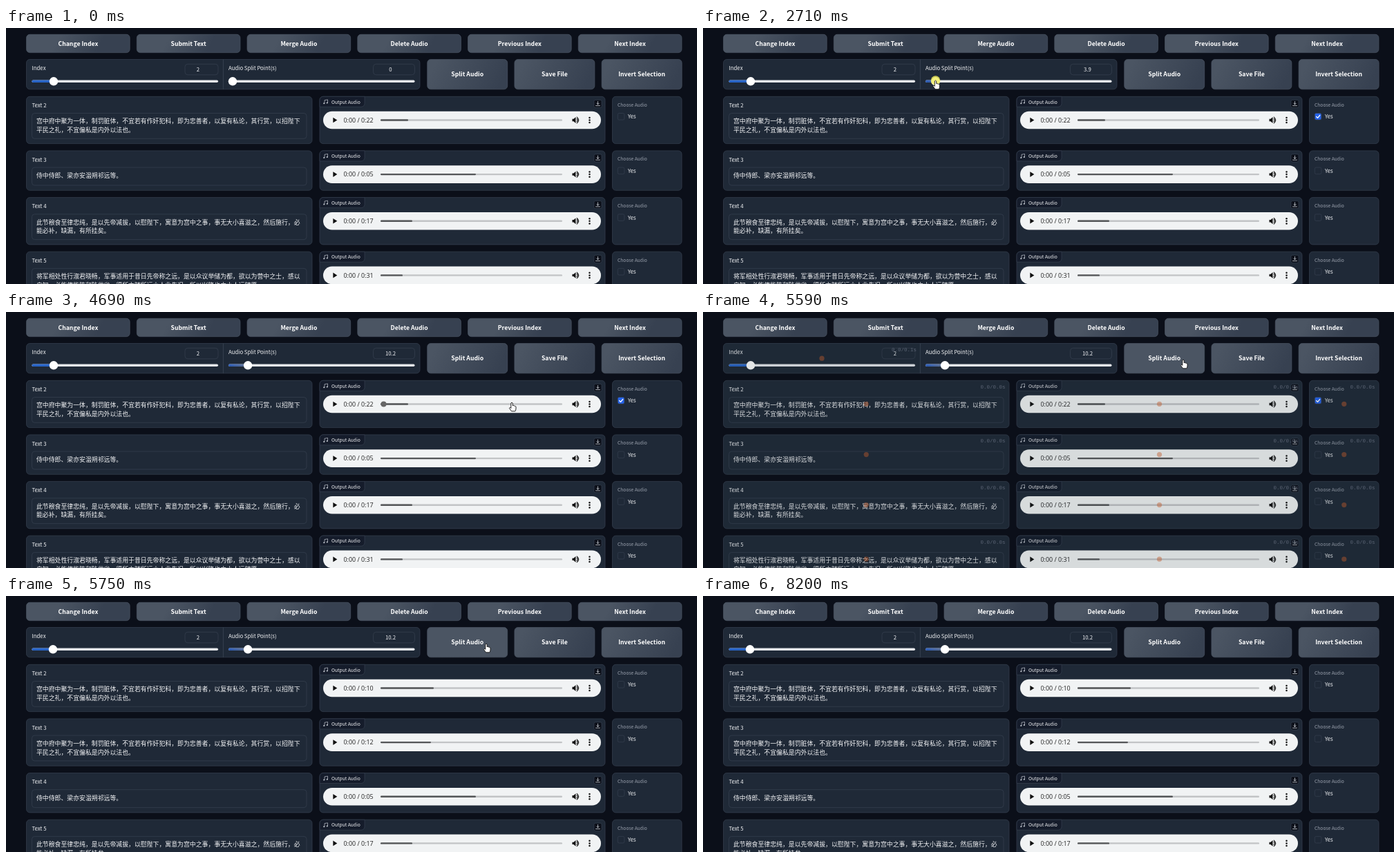
Write an HTML page with a canvas that moves like this. It is 1000x371 px and loops after 9610 ms.

```html
<!DOCTYPE html>
<html lang="zh-Hans">
<head>
<meta charset="utf-8">
<style>
html, body { margin: 0; width: 100%; height: 100%; overflow: hidden; background: #0b0f19; }
canvas { display: block; }
</style>
</head>
<body>
<canvas id="stage" width="1000" height="371"></canvas>
<script>
const ctx = document.getElementById('stage').getContext('2d');
const LOOP = 9610, STEP = 80;
const UI = '"Noto Sans CJK SC", "Noto Sans CJK", sans-serif';
const CLOCK = '"Open Sans", "Noto Sans", sans-serif';
const MONO = '"Liberation Mono", monospace';
const PANEL = '#1f2937', BORDER = '#374151', WHITE = '#f3f4f6';

// Text lines, clip length, end of the buffered part
const palace = [['宫中府中聚为一体，制罚脏体，不宜若有作奸犯科，即为忠善者，以复有私论，其行赏，以招陛下', '平民之礼，不宜偏私是内外以法也。'], '0:22', 582];
const aides = [['侍中侍郎、梁亦安温朔祁远等。'], '0:05', 680];
const advice = [['此节稂食至律忠纯，是以先帝减拔，以慰陛下，寓意为宫中之事，事无大小喜滋之，然后施行，必', '能必补，缺漏，有所挂矣。'], '0:17', 588];
const general = [['将军相处性行淑君晓畅，军事适用于昔日先帝称之远，是以众议举储为都，欲以为营中之士，感以', '自知，必能使能阵和陟优劣，得所亦随所远小人此先况，所以兴隆也亦小人远随愿。'], '0:31', 574];
const rowsBefore = [palace, aides, advice, general];
const rowsAfter = [[palace[0], '0:10', 619], [palace[0], '0:12', 615], aides, advice];

// Each stroke is a list of [time, x, y]; the pointer rests between strokes
const strokes = [
  [[500, 658, 358], [660, 790, 325], [820, 950, 255], [980, 905, 140], [1070, 892, 127]],
  [[1500, 850, 138], [1660, 630, 147], [1820, 442, 106], [1980, 372, 88], [2220, 332, 76]],
  [[2630, 334, 76], [2790, 339, 76]],
  [[3040, 341, 76], [3360, 354, 77], [3520, 356.4, 77]],
  [[3850, 354, 76], [4010, 350.1, 75]],
  [[4530, 400, 86], [4690, 732, 131], [4850, 714, 64], [5010, 697, 76]],
  [[5590, 695, 69]],
  [[6410, 694, 70], [6490, 693, 71]],
  [[6920, 691, 75], [7080, 687, 82], [7240, 708, 125], [7480, 800, 214], [7720, 915, 292], [7880, 954, 323]],
  [[7960, 956, 334], [8120, 960, 363], [8200, 962, 390]]
];

function pointerAt(t) {
  const stroke = strokes.filter(s => s[0][0] <= t).pop();
  if (!stroke || t >= 8200) return null;
  const start = stroke[0][0], last = stroke[stroke.length - 1];
  if (t >= last[0]) return { x: last[1], y: last[2] };
  const now = start + Math.floor((t - start) / STEP) * STEP;
  const i = stroke.findIndex(k => k[0] > now);
  const [a, b] = [stroke[i - 1], stroke[i]];
  const u = (now - a[0]) / (b[0] - a[0]);
  return { x: a[1] + (b[1] - a[1]) * u, y: a[2] + (b[2] - a[2]) * u };
}

const inside = (p, x0, y0, x1, y1) => p && p.x >= x0 && p.x <= x1 && p.y >= y0 && p.y <= y1;

function box(x, y, w, h, r, fill, stroke) {
  ctx.beginPath();
  ctx.roundRect(x, y, w, h, r);
  if (fill) { ctx.fillStyle = fill; ctx.fill(); }
  if (stroke) { ctx.strokeStyle = stroke; ctx.lineWidth = 0.7; ctx.stroke(); }
}

function dot(x, y, r, fill) {
  ctx.beginPath();
  ctx.arc(x, y, r, 0, Math.PI * 2);
  ctx.fillStyle = fill;
  ctx.fill();
}

function label(text, x, cy, size = 7.8, color = WHITE, align = 'left', family = UI, weight = 400) {
  ctx.font = `${weight} ${size}px ${family}`;
  ctx.textAlign = align;
  ctx.fillStyle = color;
  ctx.fillText(text, x, cy + size * 0.37);
}

function icon(x, y, path, fill, stroke, width = 1) {
  const shape = new Path2D(path);
  ctx.save();
  ctx.translate(x, y);
  if (fill) { ctx.fillStyle = fill; ctx.fill(shape); }
  if (stroke) {
    ctx.strokeStyle = stroke;
    ctx.lineWidth = width;
    ctx.lineJoin = ctx.lineCap = 'round';
    ctx.stroke(shape);
  }
  ctx.restore();
}

function button(text, x, y, w, h, hover) {
  const shade = ctx.createLinearGradient(x + w / 2 - h, y, x + w / 2 + h, y + h);
  shade.addColorStop(0, '#4b5563');
  shade.addColorStop(1, hover ? '#4b5563' : BORDER);
  box(x, y, w, h, 5, shade, '#4b5563');
  label(text, x + w / 2, y + h / 2, 8.7, '#fff', 'center', UI, 600);
}

function slider(name, x, numberWidth, value, thumb, fill) {
  label(name, x, 58.5);
  box(x + 269.5 - numberWidth, 52.3, numberWidth, 15.5, 4, PANEL, BORDER);
  label(value, x + 269.5 - numberWidth / 2 - 5, 60.3, 7.8, WHITE, 'center');
  box(x, 75.6, 269.5, 3.4, 1.7, '#e5e7eb');
  box(x, 75.6, thumb - x, 3.4, 1.7, fill);
  dot(thumb, 77.3, 6.2, '#fff');
}

function player(y, h, length, buffered, p) {
  box(454, y, 413, h, 5, PANEL, BORDER);
  box(454, y, 65, 15, [5, 0, 5, 0], '#151c2b', BORDER);
  icon(459, y + 4, 'M2 6V1.4L6.5 .6V5.2', null, '#c3c8d0', 0.7);
  dot(460.2, y + 10, 1, '#c3c8d0');
  dot(464.7, y + 9.2, 1, '#c3c8d0');
  label('Output Audio', 471, y + 7.8, 6.7);
  box(851, y + 5, 11, 11, 2, '#0b0f19', BORDER);
  icon(853.5, y + 7.3, 'M3 0V4M1.3 2.6L3 4.3L4.7 2.6M0 6H6', null, '#d1d5db', 0.8);

  const cy = y + 34.2;
  box(459, cy - 12.8, 402, 25.6, 12.8, '#f1f3f4');
  icon(473.3, cy - 3.8, 'M0 0L6 3.8L0 7.6Z', '#111');
  label('0:00 / ' + length, 488.5, cy, 8.9, '#222', 'left', CLOCK);
  box(542, cy - 1.2, 263, 2.4, 1.2, '#c2c4c6');
  box(542, cy - 1.2, buffered - 542, 2.4, 1.2, '#555759');
  if (inside(p, 459, cy - 13, 861, cy + 13)) dot(546.5, cy, 4, '#666');
  icon(819.5, cy - 5, 'M0 3.3H2L5 .6V9.4L2 6.7H0Z', '#111');
  icon(819.5, cy - 5, 'M6.7 2.8Q8.6 5 6.7 7.2M6.7 .7Q11.8 5 6.7 9.3', null, '#111', 1.1);
  for (const dy of [-3.6, 0, 3.6]) dot(844.5, cy + dy, 1.25, '#111');
}

function choice(y, h, checked, focused) {
  box(877.5, y, 100.5, h, 5, PANEL, BORDER);
  label('Choose Audio', 885, y + 12, 6.7, '#9ca3af');
  box(885.3, y + 24.2, 9.6, 9.6, 2, checked ? '#2563eb' : PANEL, focused ? '#3b82f6' : BORDER);
  if (checked) icon(885.3, y + 24.2, 'M2.3 5L4.2 6.9L7.4 3', null, '#fff', 1.3);
  label('Yes', 900, y + 29.3);
}

function loading(x, y, w, h, alpha, time = '0.0/0.0s') {
  ctx.globalAlpha = alpha;
  box(x, y, w, h, 5, PANEL);
  ctx.globalAlpha = 1;
  label(time, x + w - 5.5, y + 8.7, 7.5, '#596272', 'right', MONO);
  dot(x + w / 2, y + Math.min(h / 2, 34), 3.6, 'rgba(190,90,45,0.45)');
}

function drawRow([lines, length, buffered], index, y, t, p, veil) {
  const h = lines.length > 1 ? 68.3 : 57.4;
  box(29.5, y, 413.5, h, 5, PANEL, BORDER);
  label('Text ' + (index + 2), 37.5, y + 13);
  box(37.5, y + 24.2, 397.5, h - 31.5, 4, PANEL, BORDER);
  lines.forEach((line, i) => label(line, 44, y + 35.8 + i * 12.8, 8.9));
  player(y, h, length, buffered, p);
  const checked = index === 0 && t >= 1250 && t < 5750;
  choice(y, h, checked, checked && t < 2380);
  if (veil) {
    loading(29.5, y, 413.5, h, veil);
    loading(454, y, 413, h, veil);
    loading(877.5, y, 100.5, h, veil);
  }
  return y + h + 10.3;
}

function drawPointer(p) {
  const hand = inside(p, 322, 69, 591, 85) || inside(p, 609, 45, 978, 89) ||
    inside(p, 542, 121, 805, 147) || inside(p, 885, 121, 915, 137);
  if (hand) {
    icon(p.x, p.y, 'M-1.2 7V1Q0-.8 1.2 1V4.6Q2.4 3.8 3.1 5Q4.3 4.4 4.8 5.6Q6 5.3 6 6.8V9Q6 11 4.8 12.8H-.4L-3.6 8.4Q-3.6 6.6-1.2 8Z', '#fff', '#111', 0.9);
  } else {
    icon(p.x, p.y, 'M0 0V9.4L2.2 7.5L3.7 11L5.3 10.3L3.8 6.9H6.7Z', '#fff', '#111', 0.8);
  }
}

function draw(t) {
  const p = pointerAt(t), split = t >= 5750;
  const veil = t >= 5590 && t < 5750 ? (t < 5670 ? 0.12 : 0.24) : 0;
  ctx.fillStyle = '#0b0f19';
  ctx.fillRect(0, 0, 1000, 371);

  ['Change Index', 'Submit Text', 'Merge Audio', 'Delete Audio', 'Previous Index', 'Next Index']
    .forEach((text, i) => button(text, 29.5 + i * 159.75, 9.3, 149.7, 26.4));
  ['Split Audio', 'Save File', 'Invert Selection'].forEach((text, i) => {
    const x = 609.7 + i * 126.2;
    button(text, x, 45.5, 116, 43.3, inside(p, x, 45, x + 116, 89));
  });

  box(29.5, 45.5, 569.5, 43.3, 5, PANEL, BORDER);
  box(314.3, 45.5, 0.3, 43.3, 0, null, BORDER);
  slider('Index', 37.5, 48, '2', split ? 68 : 69, '#2864c7');
  const thumb = t < 2630 ? 328 : t < 4530 ? p.x : 350.1;
  const value = (thumb - 328) / 2.165;
  const fade = ctx.createLinearGradient(322, 0, 357, 0);
  fade.addColorStop(0, '#2b5cb8');
  fade.addColorStop(1, '#777b84');
  slider('Audio Split Point(s)', 322, 60, value ? value.toFixed(1) : '0', thumb, fade);
  if (veil) loading(29.5, 45.5, 285, 43.3, veil, '0.0/0.1s');

  let y = 99.3;
  (split ? rowsAfter : rowsBefore).forEach((row, i) => { y = drawRow(row, i, y, t, p, veil); });

  const pressed = [[1250, 1330], [2380, 4360], [5180, 5260]].some(([a, b]) => t >= a && t < b);
  if (pressed) dot(p.x, p.y, 6.8, 'rgba(240,236,90,0.8)');
  if (p) drawPointer(p);
}

function frame(now) {
  draw(now % LOOP);
  requestAnimationFrame(frame);
}
requestAnimationFrame(frame);
</script>
</body>
</html>
```
